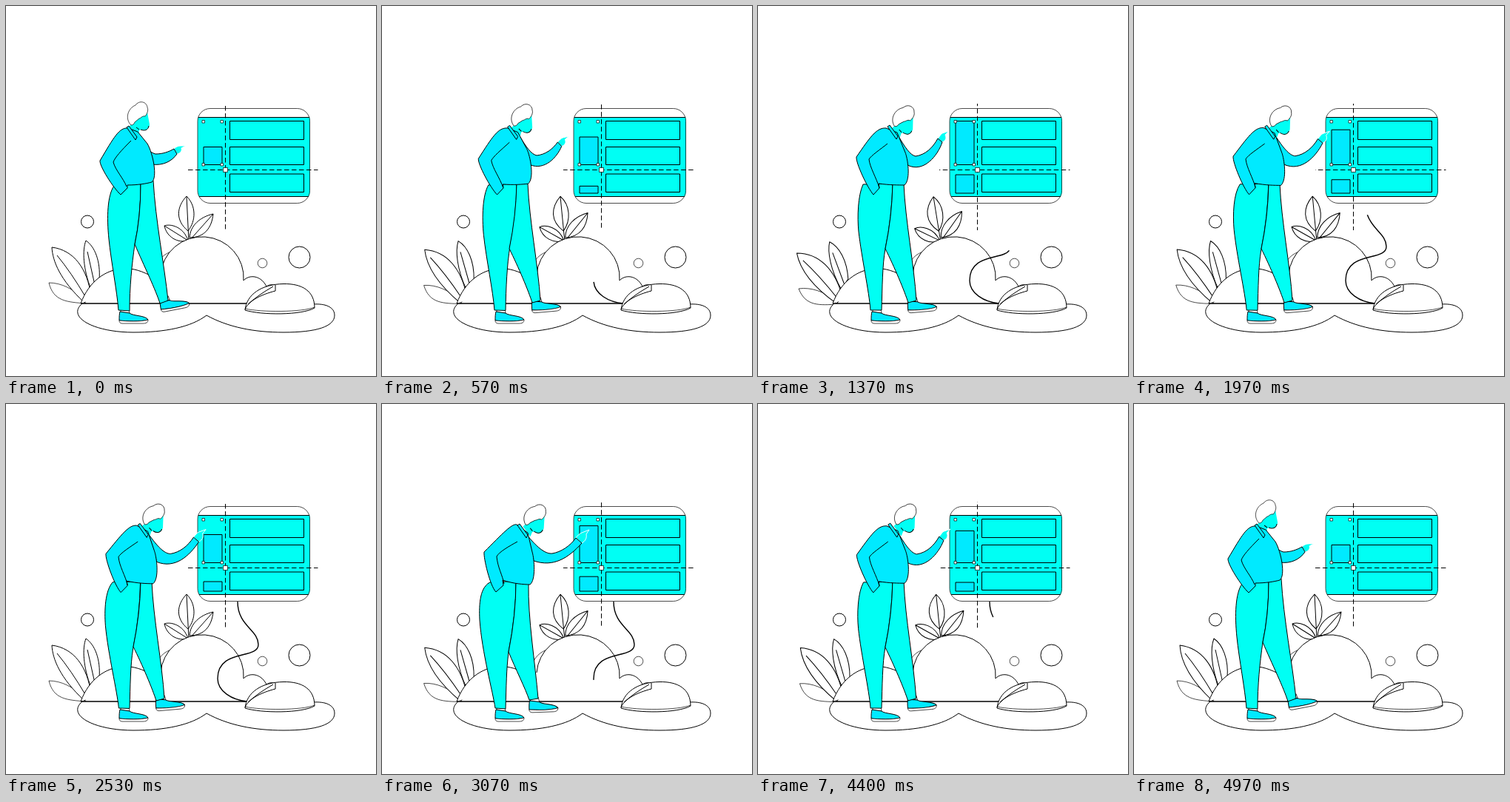
An HTML page for the animation above (5 s loop, 500 px wide and 500 px high).

```html
<!DOCTYPE html>
<html lang="en">
<head>
<meta charset="utf-8">
<title>Adjusting a layout</title>
<style>
  html, body { margin: 0; width: 100%; height: 100%; overflow: hidden; background: #fff; }
  svg { display: block; width: 100%; height: 100%; fill: #fff; stroke: #000; stroke-linejoin: round; }
  .cyan { fill: #00fff4; }
  .blue { fill: #00eaff; }
  .line { fill: none; }
  .thin { stroke-width: .7; }
  .bold { stroke-width: 1.4; }
  .bare { stroke: none; }
  .pale { stroke: #fff; }
  .dash { fill: none; stroke-dasharray: 6.5 3.5; }
</style>
</head>
<body>
<svg viewBox="0 0 500 500">
  <defs>
    <g id="shoe">
      <path class="thin" d="M2-19H13L14-13 2-14Z"/>
      <path class="blue" d="M1-15 14-13C18-9 36-10 39-4 28-1 10-2 0-3 0-8 0-11 1-15Z"/>
      <path class="thin" d="M0-3C10-2 28-1 39-4 39 0 36 1 32 1L4 1C1 1 0-1 0-3Z"/>
    </g>
    <clipPath id="card"><rect x="259" y="138.500" width="152" height="128" rx="17"/></clipPath>
  </defs>

  <circle cx="110" cy="291.5" r="8.5"/>
  <circle cx="346.5" cy="347.5" r="6.3" class="thin"/>
  <circle cx="396.5" cy="339.5" r="14.5"/>

  <g id="fern">
    <path class="thin" d="M58 374C75 374 92 383 103 395L108 402C82 400 64 399 58 374Z"/>
    <path d="M62 326C63 345 73 370 106 401L115 392C110 355 92 330 62 326ZM69 337Q88 360 108 394"/>
    <path d="M108 317C103 330 104 355 115 383L126 370C128 345 120 325 108 317ZM110 332 120 377"/>
  </g>
  <g id="sprout">
    <path d="M214 297C222 294 240 298 246 317 232 321 217 312 214 297ZL246 317"/>
    <path d="M280 281C262 285 249 297 248 313 268 313 278 300 280 281ZL247 318"/>
    <path d="M244 257C230 272 229 290 246 304 257 290 257 270 244 257ZL247 318"/>
  </g>

  <path d="M103 402C81 421 120 441 172 441 215 441 250 434 271 418 300 434 335 441 375 441 420 441 444 433 444 418 444 406 430 402 416 403"/>
  <path class="thin" d="M205 347C212 335 222 331 232 331"/>
  <path d="M101 402C112 372 135 356 158 355 172 354 184 358 200 367"/>
  <path d="M209 363A56 55 0 0 1 321 371"/>
  <path d="M352 379Q357 375 365 378M321 371C328 363 344 363 352 379"/>
  <path class="line bold" d="M101 402H326"/>
  <path id="wire" class="line bold" pathLength="1" d="M326 402C305 400 286 388 286 371 286 330 341 346 341 325 341 305 313 300 313 267"/>

  <path d="M323 411C325 390 345 376 375 375.500 400 375 417 385 417 408 400 418 345 418 323 411Z"/>
  <path class="line" d="M323 410C328 398 345 390 364 385V377M327 403Q340 391 361 379"/>
  <path class="line thin" d="M323 409C345 414 400 414 417 407"/>

  <path class="cyan" clip-path="url(#card)" d="M250 150.500H420V257.500H250Z"/>
  <rect x="259" y="138.500" width="151.500" height="128" rx="17" class="line thin"/>
  <g class="cyan">
    <rect x="302.500" y="155.500" width="100" height="25"/>
    <rect x="302.500" y="190.500" width="100" height="24"/>
    <rect x="302.500" y="227" width="100" height="24.500"/>
  </g>
  <rect id="upper" class="blue" x="267" width="25"/>
  <rect id="lower" class="blue" x="267" width="25"/>
  <path class="dash" id="dashV" d="M296.500 132V303"/>
  <path class="dash" id="dashH" d="M245 221.500H421.500"/>
  <path class="thin" d="M265 154.500h3.500v3.500h-3.500zM290 154.500h3.500v3.500h-3.500zM265 212.500h3.500v3.500h-3.500zM290 212.500h3.500v3.500h-3.500z"/>
  <path class="thin" d="M293.500 218.500h6v6h-6z"/>

  <use href="#shoe" x="153" y="428"/>
  <use id="step" href="#shoe"/>
  <path id="backLeg" class="cyan"/>
  <path id="frontLeg" class="cyan"/>
  <path id="hand" class="cyan pale"/>
  <path id="arm" class="blue"/>
  <g id="head">
    <path class="cyan bare" d="M178 150 191 144 194 160C193 168 187 169 183 167L180 168 179 175 166 164 171 157Z"/>
    <path class="line" d="M180 167 176 164M193 162C192 168 187 169 182 167"/>
    <path class="thin" d="M169 161C160 152 165 138 175 134 180 127 190 129 191 137 193 141 190 147 188 149 184 148 182 152 180 152L174 157C173 160 171 161 169 161Z"/>
  </g>
  <path id="jacket" class="blue"/>
  <path id="sleeve" class="line"/>
  <path id="collar" class="blue" d="M0 0 3-2 14 13 12 17Z"/>
</svg>
<script>
const LOOP = 5000, FPS = 30;
const $ = id => document.getElementById(id);
const set = (id, attrs) => { for (const k in attrs) $(id).setAttribute(k, attrs[k]); };
const clamp = x => Math.min(1, Math.max(0, x));
const NUMBER = /-?\d+(\.\d+)?/g;

// Each part has three poses: upright, reaching, leaning.
const shapes = {
  backLeg: [
    'M146 243C137 256 136 285 139 315C142 345 150 385 152 411L167 412C167 380 170 350 174 322Q182 285 182 240Z',
    'M142 241C135 256 134 285 136 305C140 340 150 385 152 411L167 411C168 380 168 350 172 328Q181 285 182 240Z',
    'M148 240C132 246 131 270 132 292C135 335 150 390 153 411L167 412C168 380 168 360 171 335Q181 285 181 240Z'],
  frontLeg: [
    'M182 240Q182 285 174 322C186 350 203 385 208 402L219 398C214 350 202 290 199 236Z',
    'M182 240Q181 285 172 328C184 352 198 385 203 401L214 398C211 350 199 290 197 240Z',
    'M181 240Q181 285 171 335C180 357 194 385 199 400L211 398C207 350 197 290 198 242Z'],
  arm: [
    'M180 178C188 190 194 198 202 200C212 200 220 197 227 193L231 200C224 210 212 216 197 214Z',
    'M190 176C198 190 206 202 213 203C226 201 236 192 243 179L249 184C243 202 224 226 202 215Z',
    'M196 177C208 192 220 203 230 202C242 200 254 192 262 181L270 188C252 208 232 221 205 212Z'],
  hand: [
    'M227 193C230 190 233 189 236 189L243 189L237 192C238 196 236 199 231 200Z',
    'M243 179C246 176 247 173 249 172L258 169L253 174C255 178 254 182 249 184Z',
    'M262 181C264 178 267 175 270 174L280 170L276 176C277 181 275 185 270 188Z'],
  jacket: [
    'M165 165C153 164 146 177 127 209C126 216 145 246 155 255L164 246L164 242C178 242 190 240 197 238C205 232 199 200 191 186L178 170Z',
    'M173 165C160 164 151 178 133 204C132 212 148 246 156 255L164 246L163 240C178 242 190 242 198 242C207 234 202 205 199 198L188 171Z',
    'M182 163C176 161 163 175 138 200C137 208 146 246 154 254L164 245L163 238C178 243 192 244 200 244C208 238 206 210 203 200L197 174Z'],
  sleeve: [
    'M169 182C155 196 147 205 145 211C148 222 158 232 163 244',
    'M175 186C165 194 153 202 150 207C151 218 160 232 164 246',
    'M183 186C172 192 158 200 155 206C156 220 163 232 165 243']
};
const moves = {
  step: ['translate(210 413) rotate(-11)', 'translate(203 414) rotate(-5)', 'translate(199 416) rotate(-2)'],
  head: ['translate(0 0) rotate(0 179 148)', 'translate(18 4) rotate(12 179 148)', 'translate(28 5) rotate(14 179 148)'],
  collar: ['translate(163 164)', 'translate(175 163)', 'translate(183 164)']
};

// Blend neighbouring poses number by number.
function mix(poses, p) {
  const i = p < 1 ? 0 : 1, to = poses[i + 1].match(NUMBER);
  let k = 0;
  return poses[i].replace(NUMBER, n => +n + (to[k++] - n) * (p - i));
}

// Eased keys: [time, value] pairs.
function track(t, keys) {
  const i = keys.findIndex(k => k[0] > t);
  const [t0, a] = keys[i - 1], [t1, b] = keys[i];
  const x = (t - t0) / (t1 - t0);
  return a + (b - a) * x * x * (3 - 2 * x);
}

const bodyKeys = [[0, 0], [570, .55], [1370, 1], [2530, 1.4], [3070, 2], [3870, 2], [LOOP, 0]];
const headKeys = [[0, 0], [570, .6], [1370, 1], [2530, 1.3], [3070, 2], [3870, 2.3], [LOOP, 0]];
const armKeys = [[0, 0], [570, .65], [1370, 1], [2530, 1.55], [3070, 2], [3870, 2], [LOOP, 0]];
const footKeys = [[0, 0], [570, 1], [2500, 1], [3070, 2], [3870, 2], [LOOP, 0]];
const upperKeys = [[0, 24], [1340, 59], [2500, 38], [3540, 59], [3870, 59], [LOOP, 24]];
const lowerKeys = [[0, 0], [1340, 25], [2500, 13], [3540, 25], [3870, 25], [4900, 0], [LOOP, 0]];

function draw(t) {
  const sway = (1 - Math.cos(t / 2500 * 2 * Math.PI)) / 2;
  set('fern', { transform: `rotate(${-8 * sway} 115 400)` });
  set('sprout', { transform: `rotate(${-6.5 * sway} 247 320)` });

  const from = clamp((t - 2500) / 2130), to = clamp(t / 2130);
  set('wire', { 'stroke-dasharray': `0 ${from} ${to - from} 2` });

  const march = t * .032;
  set('dashV', { 'stroke-dashoffset': -3 - march });
  set('dashH', { 'stroke-dashoffset': -1 - march });

  const up = track(t, upperKeys), low = track(t, lowerKeys);
  set('upper', { y: 214.5 - up, height: up });
  set('lower', { y: 253 - low, height: low });

  const body = track(t, bodyKeys), head = track(t, headKeys);
  const arm = track(t, armKeys), foot = track(t, footKeys);
  const pace = { frontLeg: foot, step: foot, arm, hand: arm, head };
  for (const id in shapes) set(id, { d: mix(shapes[id], pace[id] ?? body) });
  for (const id in moves) set(id, { transform: mix(moves[id], pace[id] ?? body) });
}

const start = performance.now();
function frame() {
  const t = (performance.now() - start) % LOOP;
  draw(Math.floor(t * FPS / 1000) * 1000 / FPS);
  requestAnimationFrame(frame);
}
frame();
</script>
</body>
</html>
```
